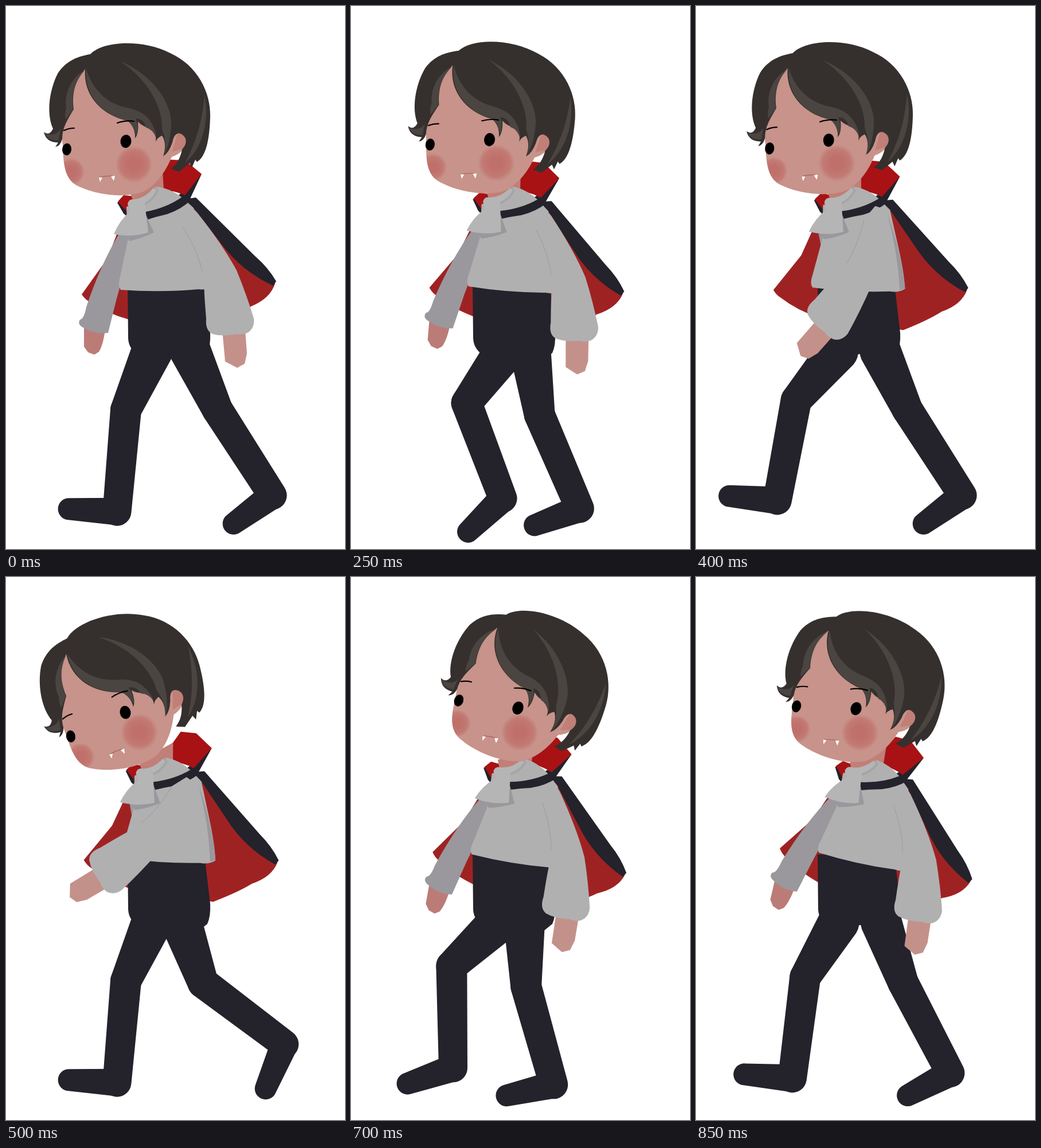
Write an HTML page with a canvas that moves like this. It is 591 px wide and 947 px high and loops after 0.9 s.

```html
<!DOCTYPE html>
<html>
<head>
<meta charset="utf-8">
<style>
  html, body { margin: 0; width: 100%; height: 100%; overflow: hidden; background: #fff; }
  canvas { display: block; }
</style>
</head>
<body>
<canvas id="stage" width="591" height="947"></canvas>
<script>
const ctx = document.getElementById('stage').getContext('2d');
const LOOP = 900, STEP = 50;
const INK = '#24222b', SHIRT = '#b0b0b0', SHADE = '#9a989c', LINING = '#9f2223',
      RED = '#a81214', SKIN = '#c7938a', HAIR = '#35302e', STRAND = '#4a4541';
const { sin, cos, PI } = Math;

// The sway: time, torso lean, head tilt, head shift.
const SWAY = [
  [0, 0, 0, 0], [150, 7, 1, 35], [350, 3, 5, 30], [500, 4, -16, -1],
  [600, -3, -15, -11], [700, 10, 15, 82], [850, 13, 10, 70]
];
function sway(t) {
  const i = SWAY.findIndex(key => key[0] >= t) || 1;
  const a = SWAY[i - 1], b = SWAY[i];
  const u = .5 - .5 * cos(PI * (t - a[0]) / (b[0] - a[0]));
  return a.map((v, c) => v + (b[c] - v) * u).slice(1);
}
function bump(t, mid, width) {
  const u = (t - mid) / width;
  return Math.abs(u) < .5 ? cos(PI * u) ** 2 : 0;
}

function fill(color, d) {
  ctx.fillStyle = color;
  ctx.fill(new Path2D(d));
}
function line(color, width, d) {
  ctx.strokeStyle = color;
  ctx.lineWidth = width;
  ctx.lineCap = 'round';
  ctx.stroke(new Path2D(d));
}
function oval(x, y, rx, ry) {
  ctx.beginPath();
  ctx.ellipse(x, y, rx, ry, .1, 0, 7);
  ctx.fill();
}
// Draws a part rotated about (x, y) and then moved by (dx, dy).
function turned(x, y, degrees, dx, dy, part) {
  ctx.save();
  ctx.translate(x + dx, y + dy);
  ctx.rotate(degrees * PI / 180);
  ctx.translate(-x, -y);
  part();
  ctx.restore();
}

// Tapered capsule; the angle is measured from straight down, backwards positive.
function limb([x, y], degrees, length, r1, r2) {
  const a = degrees * PI / 180, q = PI / 2;
  const end = [x + length * sin(a), y + length * cos(a)];
  ctx.fillStyle = INK;
  ctx.beginPath();
  ctx.arc(x, y, r1, 2 * q - a, 4 * q - a);
  ctx.arc(...end, r2, -a, 2 * q - a);
  ctx.fill();
  return end;
}

// One stride: each joint angle is a sum of three harmonics.
function leg(t) {
  const p = t / LOOP * 2 * PI, c = n => cos(n * p), s = n => sin(n * p);
  const thigh = -9 - 25 * c(1) + 21 * s(1) + 10 * c(2) + 3 * s(2) - 3 * s(3);
  const shin = 17 - 28 * c(1) + 2 * c(2) + 9 * s(2) + 4 * c(3) - 5 * s(3);
  const drop = 24 - 32 * c(1) - 11 * s(1) + 13 * s(2) + 5 * c(3) - 4 * s(3);
  const hip = [285 + 38 * cos(p - 2.5), 602];
  const knee = limb(hip, thigh, 112, 36, 27);
  const heel = limb(knee, shin, 178, 27, 25);
  limb(heel, drop - 90, 84, 24, 19);
}

function cape() {
  fill(LINING, 'M195 380L172 440L127 503Q133 512 141 516Q170 536 210 547L357 560Q400 540 422 524Q456 510 464 484L310 340Z');
  fill(INK, 'M298 338L326 334L430 437Q452 456 466 480L461 488Q405 462 370 414L322 352Z');
  fill(INK, 'M189 343L202 334L212 372L200 362Z');
  fill(RED, 'M190 341L200 330L220 332L207 360Z');
  fill(INK, 'M336 293L316 336L298 346L296 330Z');
  fill(RED, 'M252 314L280 268L307 269L336 293L307 330Q285 320 262 322Z');
}

function farArm() {
  fill('#bb7c77', 'M131 558L168 562Q165 590 157 603L149 608L138 604L131 594Z');
  fill(SHADE, 'M194 394L216 390Q200 470 188 510L173 570Q150 573 132 562Q118 556 124 547Q131 546 135 525Q160 450 194 394Z');
}

function shirt() {
  fill('#c07f77', 'M211 325L268 288L270 320Q240 340 216 338Z');
  fill(SHIRT, 'M205 350Q240 340 258 315Q282 318 302 334L322 352Q330 380 340 415Q353 460 356 488Q345 496 330 494Q265 500 195 495Q189 488 194 472L207 410Z');
  fill(SHADE, 'M318 360Q346 425 356 487L347 491Q340 425 318 360Z');
  fill(INK, 'M238 359Q275 352 302 333L318 338Q300 355 276 363Q258 367 240 373Z');
  fill(SHADE, 'M238 362L253 395Q230 406 210 410L200 398Z');
  fill('#a5a5a7', 'M211 338Q240 345 256 314L261 322Q250 346 228 350Z');
  fill('#b5b5b6', 'M207 346Q208 336 219 337Q238 335 252 317L257 322Q248 338 237 343Q240 372 243 395Q215 404 183 398Q192 375 212 357Z');
}

function nearArm() {
  fill('#c4918a', 'M372 565L412 565L415 606L411 624L398 631L377 620Z');
  fill(SHIRT, 'M300 356Q315 345 328 360Q372 415 397 461Q415 505 427 545Q429 562 416 570Q404 574 398 572Q372 577 355 572Q342 566 344 545Q340 500 340 472Q330 425 303 387Z');
  line('#9c9c9c', 1, 'M304 387Q330 428 337 462');
}

function cheek(x, y, r) {
  const g = ctx.createRadialGradient(x, y, r * .35, x, y, r);
  g.addColorStop(0, '#c0706b');
  g.addColorStop(.65, '#c0706bb0');
  g.addColorStop(1, '#c0706b00');
  ctx.fillStyle = g;
  oval(x, y, r, r);
}

function head() {
  const face = 'M96 215L99 245C100 288 107 307 130 316C165 332 217 335 243 322C266 308 280 285 289 263C306 258 317 244 314 228L280 110L140 90L110 150Z';
  fill(SKIN, face);
  ctx.save();
  ctx.clip(new Path2D(face));
  fill('#c07f77', 'M300 218L318 224L314 247L290 254Z');
  cheek(223, 276, 32);
  cheek(113, 289, 24);
  ctx.restore();

  fill(HAIR, 'M138 110C122 128 114 150 118 180C106 200 98 213 98 232Q95 244 86 246L91 238Q70 238 66 220Q76 227 82 214C71 190 74 150 90 118C105 95 125 88 147 84C170 60 240 58 286 82C335 104 357 152 356 192C355 235 348 263 333 272L330 268L324 282L320 274L302 289L287 284C298 276 304 265 307 250C317 240 316 226 302 222Q293 222 290 238Q284 256 274 262Q281 240 272 226Q263 230 261 237Q263 222 252 212Q240 212 230 202Q232 222 225 231Q226 212 212 200C172 192 134 160 138 110Z');
  fill(STRAND, 'M140 110C152 150 180 172 214 178Q240 184 251 200Q262 216 262 230Q256 215 244 212Q240 196 226 196Q232 208 227 226Q224 208 210 199C172 190 136 160 140 110Z');
  fill(STRAND, 'M200 97C248 116 285 160 288 200Q288 236 276 260Q281 236 272 215C274 180 250 130 200 97Z');
  fill(STRAND, 'M137 112C122 130 113 150 117 180L104 198Q102 188 105 178C101 150 115 125 137 112Z');
  fill(STRAND, 'M346 155C356 205 340 250 312 274C330 240 342 205 346 155Z');
  fill(STRAND, 'M95 214Q88 228 68 223Q74 236 92 234Z');

  ctx.fillStyle = '#000';
  oval(106, 250, 8, 10.5);
  oval(209, 236, 9.5, 11.5);
  line('#000', 2.2, 'M101 217Q110 213 119 213M194 204Q208 199 223 201');
  line('#a8605c', 1.2, 'M163 299Q176 295 190 297');
  fill('#fff', 'M162 299L168 299L164 307ZM183 297L190 296L188 305Z');
}

function draw(t) {
  const [lean, tilt, shift] = sway(t);
  const reach = 60 * bump(t, 490, 500), tuck = -52 * bump(t, 450, 420);
  const upper = part => turned(265, 550, lean, 5, 0, part);
  ctx.fillStyle = '#fff';
  ctx.fillRect(0, 0, 591, 947);
  upper(() => {
    cape();
    turned(205, 390, tuck, 0, 0, farArm);
  });
  leg(t - 500);
  leg(t);
  fill(INK, 'M212 484L346 484Q350 520 356 570Q357 592 351 605L335 618L298 606L235 612Q214 600 213 580Z');
  upper(shirt);
  turned(209, 236, tilt, shift, -shift / 11, head);
  upper(() => turned(318, 368, reach, -.4 * reach, 0, nearArm));
}

function tick() {
  const t = performance.now() - start;
  draw(Math.floor(t % LOOP / STEP) * STEP);
  requestAnimationFrame(tick);
}
const start = performance.now();
tick();
</script>
</body>
</html>
```
